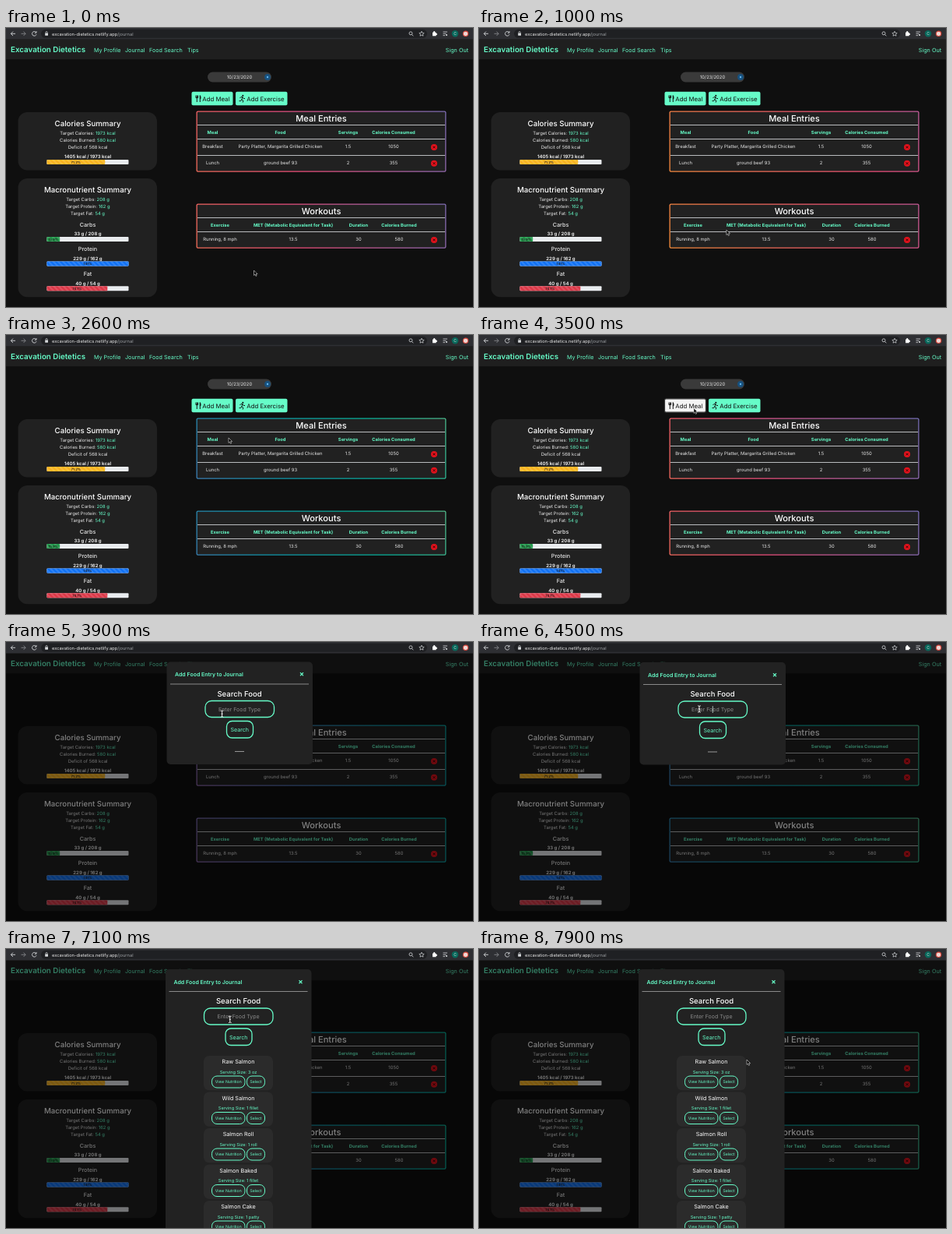
An HTML page that plays this animation: 600x358 px, repeating every 8000 ms.

```html
<!DOCTYPE html>
<html lang="en">
<head>
<meta charset="utf-8">
<title>Nutrition journal</title>
<style>
  html, body { margin: 0; width: 100%; height: 100%; overflow: hidden; background: #0f0f0f; }
  svg { display: block; width: 100%; height: 100%; }
  text { font-family: Inter, Roboto, sans-serif; white-space: pre; text-rendering: geometricPrecision; }
</style>
</head>
<body>
<svg id="stage" viewBox="0 0 600 358"></svg>
<script>
const MINT = '#66fcc8', PANEL = '#212121', LIGHT = '#e8e8e8';
const LOOP = 8000, REM = 6.2;

// ---- drawing helpers ----
const rect = (x, y, w, h, fill, r = 0, extra = '') =>
  `<rect x="${x}" y="${y}" width="${w}" height="${h}" rx="${r}" fill="${fill}" ${extra}/>`;
const circle = (x, y, r, fill, extra = '') => `<circle cx="${x}" cy="${y}" r="${r}" fill="${fill}" ${extra}/>`;
const path = (d, stroke, width = 1, extra = 'fill="none"') =>
  `<path d="${d}" stroke="${stroke}" stroke-width="${width}" ${extra}/>`;
// Text is placed by the vertical middle of its letters.
const text = (str, x, middle, size, { fill = LIGHT, weight = 400, anchor = 'middle', id = '' } = {}) =>
  `<text x="${x}" y="${middle + size * 0.4}" font-size="${size}" font-weight="${weight}" fill="${fill}" text-anchor="${anchor}"${id && ` id="${id}"`}>${str}</text>`;
const labelled = (label, value, y) => text(`${label} <tspan fill="${MINT}">${value}</tspan>`, 105, y, 5.9);
const outlined = (x, y, w, h, r, width) => rect(x, y, w, h, 'none', r, `stroke="${MINT}" stroke-width="${width}"`);

// ---- page parts ----
function browserBar() {
  const ink = '#d5d7da';
  return rect(0, 0, 600, 14.5, '#2e2f33') + rect(45, 1.8, 496, 11, '#1f2023', 5.5)
    + path('M12 7.3H6.5M9 4.6L6.3 7.3L9 10', ink, 0.9)
    + path('M19.5 7.3H25M22.5 4.6L25.2 7.3L22.5 10', '#85878b', 0.9)
    + path('M38.5 5.5A2.8 2.8 0 1 0 39 8.2M39 4V6.2H36.8', ink, 0.9)
    + rect(50.2, 6.6, 3.8, 3.2, ink, 0.5) + path('M51 6.8V5.6A1.1 1.1 0 0 1 53.2 5.6V6.8', ink, 0.7)
    + text('excavation-dietetics.netlify.app<tspan fill="#9a9da1">/journal</tspan>', 59, 7.4, 5.7, { anchor: 'start' })
    + path('M521.6 8.5L523.3 10.2', ink, 0.9) + circle(520, 6.8, 2, 'none', `stroke="${ink}" stroke-width=".8"`)
    + path('M534 4.2L534.9 6.3L537.2 6.5L535.5 8L536 10.2L534 9L532 10.2L532.5 8L530.8 6.5L533.1 6.3Z', ink, 0.7)
    + rect(548, 5.6, 4.6, 4.6, '#fff', 0.5) + circle(550.2, 5.2, 1.1, '#fff') + circle(552.9, 7.9, 1.1, '#fff')
    + path('M561.5 5H567M561.5 7.3H565.5M561.5 9.6H564', ink, 0.8) + circle(566, 9, 1.1, ink)
    + circle(577, 7.3, 4.2, '#09695c') + text('C', 577, 7.1, 5)
    + circle(590.5, 7.3, 3.2, '#f0d6d2', 'stroke="#d9473c" stroke-width="1.1"');
}

function navBar() {
  const link = (str, x, anchor = 'start') => text(str, x, 27.7, 7.2, { fill: MINT, anchor });
  return rect(0, 14.5, 600, 25.7, '#1f1f1f')
    + text('Excavation Dietetics', 6, 27.5, 9.8, { fill: MINT, weight: 600, anchor: 'start' })
    + link('My Profile', 113) + link('Journal', 153) + link('Food Search', 184) + link('Tips', 233)
    + link('Sign Out', 594, 'end');
}

function progress(y, percent, fill, label) {
  const width = 105 * Math.min(percent, 100) / 100;
  return rect(52.5, y, 105, 6, '#e9ecef', 1) + rect(52.5, y, width, 6, fill, 1)
    + rect(52.5, y, width, 6, 'url(#stripes)', 1)
    + text(label, 52.5 + width / 2, y + 3, 4.4, { fill: '#111', weight: 500 });
}

function macro(name, amount, y, percent, fill, label) {
  return text(name, 105, y, 7.2, { weight: 500 })
    + text(amount, 105, y + 11.9, 6, { weight: 700 }) + progress(y + 16, percent, fill, label);
}

function summaries() {
  const title = (str, y) => text(str, 105, y, 9.7, { fill: '#fff', weight: 500 });
  return rect(15.5, 108, 178.5, 74.5, PANEL, 12) + title('Calories Summary', 121.7)
    + labelled('Target Calories:', '1973 kcal', 135) + labelled('Calories Burned:', '580 kcal', 144)
    + text('Deficit of 568 kcal', 105, 153, 5.9)
    + text('1405 kcal / 1973 kcal', 105, 164.6, 6, { weight: 700 })
    + progress(169, 71.2, '#fcb41c', '71.2%')
    + rect(15.5, 193, 178.5, 152.3, PANEL, 12) + title('Macronutrient Summary', 206.7)
    + labelled('Target Carbs:', '208 g', 220) + labelled('Target Protein:', '162 g', 229)
    + labelled('Target Fat:', '54 g', 238)
    + macro('Carbs', '33 g / 208 g', 251.9, 15.9, '#1f9a4a', '15.9%')
    + macro('Protein', '229 g / 162 g', 283.6, 141, '#0d70f5', '141%')
    + macro('Fat', '40 g / 54 g', 315.3, 74.1, '#dc3545', '74.1%');
}

const boxes = [
  { x: 244.5, y: 106.5, w: 321, h: 78.3 },
  { x: 244.5, y: 225.5, w: 321, h: 57.3 },
];

function table(index, title, columns, heads, rows) {
  const { x, y, w, h } = boxes[index];
  const rule = dy => path(`M246 ${y + dy}H564`, '#b9bbbe', 1);
  const cells = (items, dy, style) =>
    items.map((item, i) => text(item, columns[i], y + dy, style ? 5.8 : 5.9, style)).join('');
  const body = rows.map((row, i) => {
    const dy = 45.4 + i * 20.8;
    return (i ? rule(57) : '') + cells(row, dy) + circle(550, y + dy + 1, 4, '#e3121c')
      + path(`M548.4 ${y + dy - 0.3}L551.6 ${y + dy + 2.3}M551.6 ${y + dy - 0.3}L548.4 ${y + dy + 2.3}`, '#4a0508', 1);
  }).join('');
  return rect(x, y, w, h, `url(#rainbow${index})`, 2) + rect(x + 1.3, y + 1.3, w - 2.6, h - 2.6, PANEL, 1)
    + text(title, 405, y + 8.7, 11.1, { fill: '#fff', weight: 500 })
    + rule(18) + cells(heads, 27.2, { fill: MINT, weight: 700 }) + rule(36) + body;
}

function toolbar() {
  const label = { fill: '#111', anchor: 'start' };
  return rect(259, 56.5, 82, 13, '#3a3a3a', 6.5) + text('10/23/2020', 300, 63, 5.9)
    + circle(336, 63, 3.9, '#17517f') + circle(336, 63, 1.2, '#62b5ee')
    + rect(238.5, 81.8, 53, 17.4, MINT, 2, 'id="addMeal"') + rect(295, 81.8, 66.5, 17.4, MINT, 2)
    + path('M244 86.5V89.5M245.3 86.5V95M246.6 86.5V89.5M243.9 89.5H246.7M249.3 86.5V95', '#111', 1)
    + path('M249.3 86.5Q251 88 250.2 91H249.3Z', '#111', 0.3, 'fill="#111"')
    + text('Add Meal', 252.3, 90.5, 7.8, label)
    + circle(304.3, 86.8, 1.1, '#111')
    + path('M300.5 90L302 88.4L304 88.8L302.7 91.8L304.8 93.2L304.2 95.5M302.7 91.8L301.6 93.6H299.5M304 88.8L305.3 90.5H307', '#111', 1)
    + text('Add Exercise', 309.3, 90.5, 7.8, label);
}

function resultCard([name, serving], i) {
  const y = 137 + i * 46.5;
  return rect(255.5, y, 89, 44.3, '#2b2b2b', 7) + text(name, 300, y + 7.4, 7.2, { fill: '#fff' })
    + text(`Serving Size: ${serving}`, 300, y + 20.7, 5.6, { fill: MINT })
    + outlined(266, y + 26, 42.5, 15, 6.5, 1) + text('View Nutrition', 287.2, y + 33.4, 5.1, { fill: MINT })
    + outlined(311, y + 26, 23, 15, 6.5, 1) + text('Select', 322.5, y + 33.4, 5.1, { fill: MINT });
}

const foods = [['Raw Salmon', '3 oz'], ['Wild Salmon', '1 fillet'], ['Salmon Roll', '1 roll'],
  ['Salmon Baked', '1 fillet'], ['Salmon Cake', '1 patty']];

function modal() {
  return rect(206.5, 26, 187.5, 131.5, '#222', 5, 'id="sheet"')
    + text('Add Food Entry to Journal', 217, 42, 7, { fill: MINT, weight: 600, anchor: 'start' })
    + text('×', 380, 40.7, 9.5, { fill: MINT, weight: 700 })
    + path('M211 54.5H389', '#a5a5a5', 0.8)
    + text('Search Food', 300, 66.5, 9.5, { fill: '#fff', weight: 500 })
    + outlined(256, 76, 88.5, 21, 8, 1.3)
    + text('', 300, 86.6, 7, { id: 'query' }) + path('M0 82.2V91', '#e6fff6', 0.7, 'id="caret"')
    + outlined(283.5, 102, 34, 21.5, 7, 1.3) + text('Search', 300.2, 112.8, 7.1, { fill: MINT })
    + path('M294 141H306', '#b5b5b5', 0.8, 'id="emptyList"')
    + `<g id="results">${foods.map(resultCard).join('')}</g>`;
}

const colors = ['#f79533', '#f37055', '#ef4e7b', '#a166ab', '#5073b8', '#1098ad', '#07b39b', '#6fba82'];
const stops = colors.map((c, i) => `<stop offset="${i / 7}" stop-color="${c}"/>`).join('');
const half = REM / 2;

stage.innerHTML = `<defs>
    ${boxes.map((_, i) => `<linearGradient id="rainbow${i}" gradientUnits="userSpaceOnUse">${stops}</linearGradient>`).join('')}
    <pattern id="stripes" width="${REM}" height="${REM}" patternUnits="userSpaceOnUse">
      <path d="M0 ${half}L${half} ${REM}H0ZM0 0H${half}L${REM} ${half}V${REM}Z" fill="#fff" opacity=".15"/>
    </pattern>
  </defs>`
  + rect(0, 0, 600, 358, '#0f0f0f') + navBar() + toolbar() + summaries()
  + table(0, 'Meal Entries', [265.5, 352.5, 439.5, 498], ['Meal', 'Food', 'Servings', 'Calories Consumed'],
    [['Breakfast', 'Party Platter, Margarita Grilled Chicken', '1.5', '1050'], ['Lunch', 'ground beef 93', '2', '355']])
  + table(1, 'Workouts', [275, 369, 453, 505],
    ['Exercise', 'MET (Metabolic Equivalent for Task)', 'Duration', 'Calories Burned'],
    [['Running, 8 mph', '13.5', '30', '580']])
  + rect(0, 14.5, 600, 343.5, '#000', 0, 'id="backdrop"')
  + `<g id="dialog">${modal()}</g>` + browserBar()
  + path('M0 0V6.4L1.5 5.1L2.5 7.4L3.6 6.9L2.6 4.6H4.6Z', '#ddd', 0.6, 'fill="#000" id="arrow"')
  + path('M-1.8 -4.2Q0 -4.2 0 -3Q0 -4.2 1.8 -4.2M0 -3V3M-1.8 4.2Q0 4.2 0 3Q0 4.2 1.8 4.2M-1 0H1', '#fff', 0.9, 'fill="none" id="ibeam"');

// ---- motion ----
const el = id => document.getElementById(id);
const set = (id, attrs) => Object.entries(attrs).forEach(([k, v]) => el(id).setAttribute(k, v));
const show = (id, on) => set(id, { visibility: on ? 'visible' : 'hidden' });
const clamp = v => Math.max(0, Math.min(1, v));

// CSS "ease" timing curve.
function ease(x) {
  let lo = 0, hi = 1, s = 0.5;
  for (let i = 0; i < 18; i++) {
    s = (lo + hi) / 2;
    0.75 * s * (1 - s) + s ** 3 < x ? lo = s : hi = s;
  }
  return 0.3 * s * (1 - s) ** 2 + 3 * s * s * (1 - s) + s ** 3;
}

// Linear interpolation through [time, value, ...] keys.
function track(keys, t) {
  const next = keys.findIndex(k => k[0] > t);
  if (next < 0) return keys[keys.length - 1].slice(1);
  if (next === 0) return keys[0].slice(1);
  const a = keys[next - 1], b = keys[next], f = (t - a[0]) / (b[0] - a[0]);
  return a.slice(1).map((v, i) => v + (b[i + 1] - v) * f);
}

const pointerKeys = [[0, 318.5, 311], [400, 318.5, 311], [1800, 317, 190], [2600, 286, 132],
  [3350, 276, 94], [3800, 276, 94], [4250, 283, 86], [7050, 283, 86], [7700, 344, 142]];
const cycleKeys = [[0, 0.745], [1800, 1.16], [2600, 1.42], [3500, 2.085], [4500, 2.4], [6100, 2.94], [8000, 3.56]];
const OPEN = 3650, FOCUS = 4350, TYPE = 4900, SUBMIT = 5900, FOUND = 6900;

function moveBorders(t) {
  const cycle = track(cycleKeys, t)[0] % 1;
  const shift = cycle < 0.5 ? ease(cycle * 2) : 1 - ease(cycle * 2 - 1);
  const sin = Math.sin(Math.PI / 3), cos = 0.5;
  boxes.forEach(({ x, y, w, h }, i) => {
    const cx = x + w * (1.5 - 2 * shift), cy = y + h / 2, reach = 1.5 * (w * sin + h * cos);
    set('rainbow' + i, { x1: cx - reach * sin, y1: cy + reach * cos, x2: cx + reach * sin, y2: cy - reach * cos });
  });
}

function moveDialog(t) {
  const fade = clamp((t - OPEN) / 150), slide = (1 - clamp((t - OPEN) / 300)) ** 2, found = t >= FOUND;
  set('backdrop', { opacity: fade * 0.5 });
  set('dialog', { opacity: fade, transform: `translate(${found ? -1.5 : 0} ${-19 * slide})` });
  set('sheet', { height: found ? 360 : 131.5 });
  show('results', found);
  show('emptyList', !found);

  const typed = t < SUBMIT ? 'salmon'.slice(0, Math.max(0, Math.ceil((t - TYPE) / 120))) : '';
  const query = el('query');
  query.textContent = typed || 'Enter Food Type';
  query.setAttribute('fill', typed ? LIGHT : '#8a8a8a');
  const caretX = typed ? 300 + query.getComputedTextLength() / 2 + 0.4 : 300.3;
  set('caret', { transform: `translate(${caretX} 0)` });
  const lastKey = t >= SUBMIT ? SUBMIT : typed ? t : FOCUS;
  show('caret', t >= FOCUS && t < FOUND && (t - lastKey) % 1000 < 500);
}

function movePointer(t) {
  const [x, y] = track(pointerKeys, t);
  const overInput = t > OPEN && x > 256 && x < 344 && y > 76 && y < 97;
  const visible = t < TYPE || t > 7050;
  for (const id of ['arrow', 'ibeam']) set(id, { transform: `translate(${x} ${y})` });
  show('arrow', visible && !overInput);
  show('ibeam', visible && overInput);
  const hover = y < 99 && t < OPEN + 400;
  set('addMeal', { fill: hover ? '#f4f4f4' : MINT, stroke: hover ? '#333' : 'none', 'stroke-width': 1.2 });
}

function frame(now) {
  const t = now % LOOP;
  set('stripes', { patternTransform: `translate(${52.5 - REM * (t % 1000) / 1000} 169)` });
  moveBorders(t);
  moveDialog(t);
  movePointer(t);
  requestAnimationFrame(frame);
}
frame(0);
</script>
</body>
</html>
```
